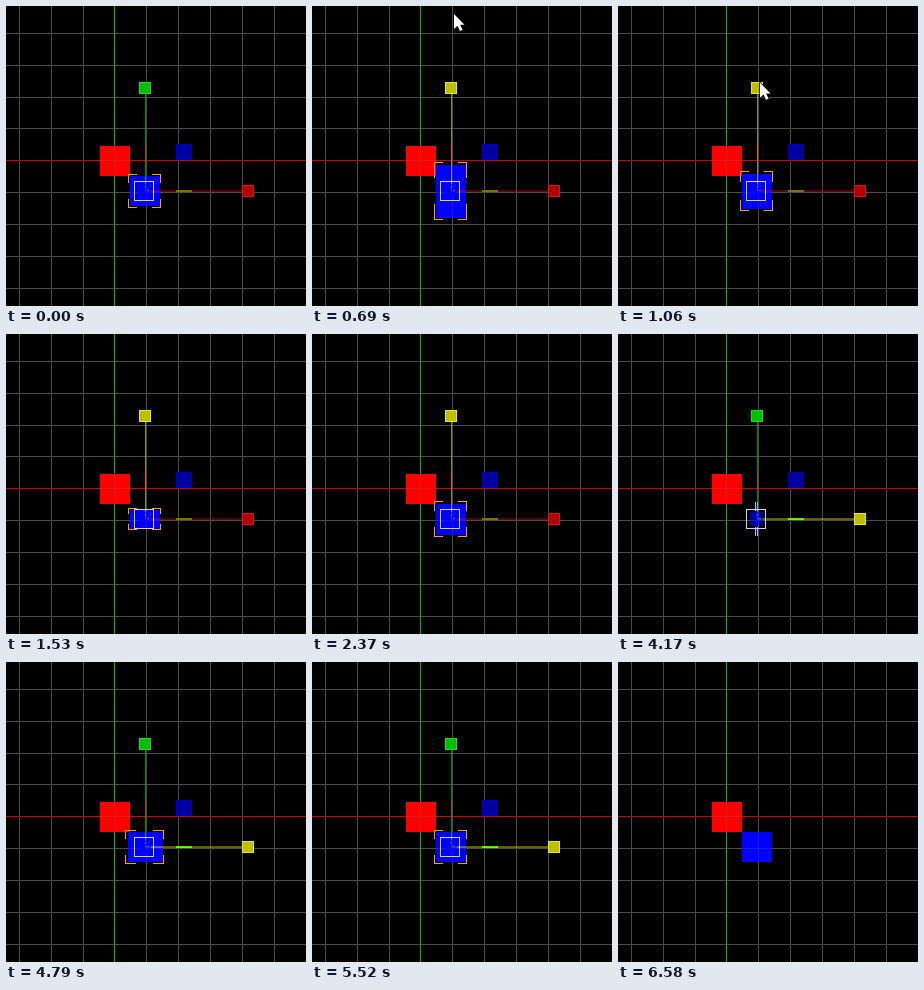
These frames come from a looping animation (300x300 px, 6840 ms). An HTML page with a canvas:

```html
<!DOCTYPE html>
<html lang="en">
<head>
<meta charset="utf-8">
<title>Scale gizmo</title>
<style>
html, body { margin: 0; width: 100%; height: 100%; overflow: hidden; background: #000; }
canvas { display: block; width: 300px; height: 300px; }
</style>
</head>
<body>
<canvas id="stage" width="300" height="300"></canvas>
<script>
const ctx = document.getElementById('stage').getContext('2d');
const LOOP = 6840;
const CENTER = { x: 139, y: 185 };

// [time, scale] keys, eased between neighbours
const SCALE_Y = [[0, 1], [400, 1], [720, 1.77], [750, 1.77], [1360, .6], [1500, .6],
  [1830, 1.42], [2170, 1.05], [2370, 1.05], [2560, 1], [LOOP, 1]];
const SCALE_X = [[0, 1], [3560, 1], [3880, 1.6], [4030, 1.6], [4170, .08], [4390, .08],
  [4850, 1.22], [5400, 1], [LOOP, 1]];

function valueAt(keys, t) {
  const i = keys.findIndex(k => k[0] > t);
  if (i < 1) return keys[keys.length - 1][1];
  const [t0, a] = keys[i - 1], [t1, b] = keys[i];
  const u = (t - t0) / (t1 - t0);
  return a + (b - a) * u * u * (3 - 2 * u);
}

function rect(x, y, w, h, color) {
  ctx.fillStyle = color;
  ctx.fillRect(x, y, w, h);
}

function frame(x, y, size, color) {
  ctx.strokeStyle = color;
  ctx.lineWidth = 1;
  ctx.strokeRect(x + .5, y + .5, size - 1, size - 1);
}

function drawGrid(color) {
  for (let i = 0; i < 9; i++) {
    rect(Math.floor(13.3 + i * 31.85), 0, 1, 300, color);
    rect(0, Math.floor(27.4 + i * 31.85), 300, 1, color);
  }
}

function drawBox(x, y, w, h, color) {
  rect(x, y, w, h, color);
  ctx.save();
  ctx.beginPath();
  ctx.rect(x, y, w, h);
  ctx.clip();
  drawGrid('rgba(128,128,128,.2)');
  ctx.restore();
}

function drawBrackets(sx, sy) {
  const left = Math.floor(138.6 - 16.3 * sx), right = Math.floor(138.6 + 16.3 * sx);
  const top = Math.floor(185 - 16.5 * sy), bottom = Math.floor(185 + 16.5 * sy);
  const w = Math.max(1, Math.round((right - left) * .28));
  const h = Math.max(1, Math.round((bottom - top) * .28));
  const color = sx < .2 ? '#8cc8f0' : '#ffa010';
  for (const y of [top, bottom]) {
    rect(left, y, w, 1, color);
    rect(right - w + 1, y, w, 1, color);
  }
  for (const x of [left, right]) {
    rect(x, top, 1, h, color);
    rect(x, bottom - h + 1, 1, h, color);
  }
}

function drawHandle(x, y, rgb, edge) {
  rect(x, y, 12, 12, `rgb(${rgb})`);
  frame(x, y, 12, edge);
}

function drawGizmo(hoverX, hoverY) {
  const { x, y } = CENTER;
  rect(x - 1, 87, 2, 0, '#000');
  rect(x, 87, 1, 98, hoverY ? 'rgba(255,255,0,.55)' : 'rgba(0,255,0,.55)');
  rect(x, 184, 97, 1, hoverX ? 'rgba(255,255,0,.35)' : 'rgba(255,0,0,.3)');
  rect(x, y, 97, 1, hoverX ? 'rgba(255,255,0,.4)' : 'rgba(255,0,0,.4)');

  rect(x, 138, 1, 16, hoverY ? '#ff5000' : '#a05000');
  rect(170, 184, 16, 1, hoverX ? '#64e600' : '#6e7800');
  rect(170, y, 16, 1, hoverX ? '#64ff00' : '#787800');
  rect(170, 138, 16, 16, '#0000a0');
  frame(170, 138, 16, '#0000b4');

  rect(132, 178, 13, 13, 'rgba(0,0,255,.62)');
  rect(x, 180, 1, 2, 'rgba(150,150,190,.5)');
  rect(141, 184, 2, 1, 'rgba(150,150,190,.5)');
  frame(128, 175, 20, '#d2d2e6');

  if (hoverY) drawHandle(133, 76, '190,190,0', '#e6e632');
  else drawHandle(133, 76, '0,190,0', '#1edc1e');
  if (hoverX) drawHandle(236, 179, '190,190,0', '#e6e632');
  else drawHandle(236, 179, '180,0,0', '#d21414');
}

function drawCursor(x, y) {
  const outline = [[0, 0], [0, 15], [3.5, 11.7], [6, 17], [8.6, 16], [6.2, 10.7], [10.5, 10.7]];
  ctx.beginPath();
  outline.forEach(([dx, dy]) => ctx.lineTo(x + dx, y + dy));
  ctx.closePath();
  ctx.strokeStyle = '#000';
  ctx.lineWidth = 1.5;
  ctx.stroke();
  ctx.fillStyle = '#fff';
  ctx.fill();
}

function drawPointer(t) {
  if (t < 70 || t >= 1115) return;
  const u = Math.min(1, (t - 70) / 180);
  if (u < 1) drawCursor(153 - 11 * u, 45 + 40 * u);
  // the pointer leads the scaled box by one tick
  else drawCursor(142, 185 - 100 * valueAt(SCALE_Y, t + 30));
}

function draw(t) {
  const sx = valueAt(SCALE_X, t), sy = valueAt(SCALE_Y, t);
  const selected = t < 6580;
  rect(0, 0, 300, 300, '#000');
  drawGrid('#4a4a4a');
  rect(0, 154, 300, 1, '#c80000');
  rect(108, 0, 1, 300, '#00be00');
  drawBox(94, 140, 30, 30, '#f00');

  const w = Math.max(2, Math.round(30 * sx)), h = Math.round(30 * sy);
  drawBox(Math.round(CENTER.x - w / 2), Math.round(CENTER.y - h / 2), w, h, '#00f');
  if (!selected) return;
  drawBrackets(sx, sy);
  drawGizmo(t >= 3320 && t < 5920, t >= 190 && t < 2760);
  drawPointer(t);
}

const start = performance.now();
function tick() {
  draw((performance.now() - start) % LOOP);
  requestAnimationFrame(tick);
}
tick();
</script>
</body>
</html>
```
